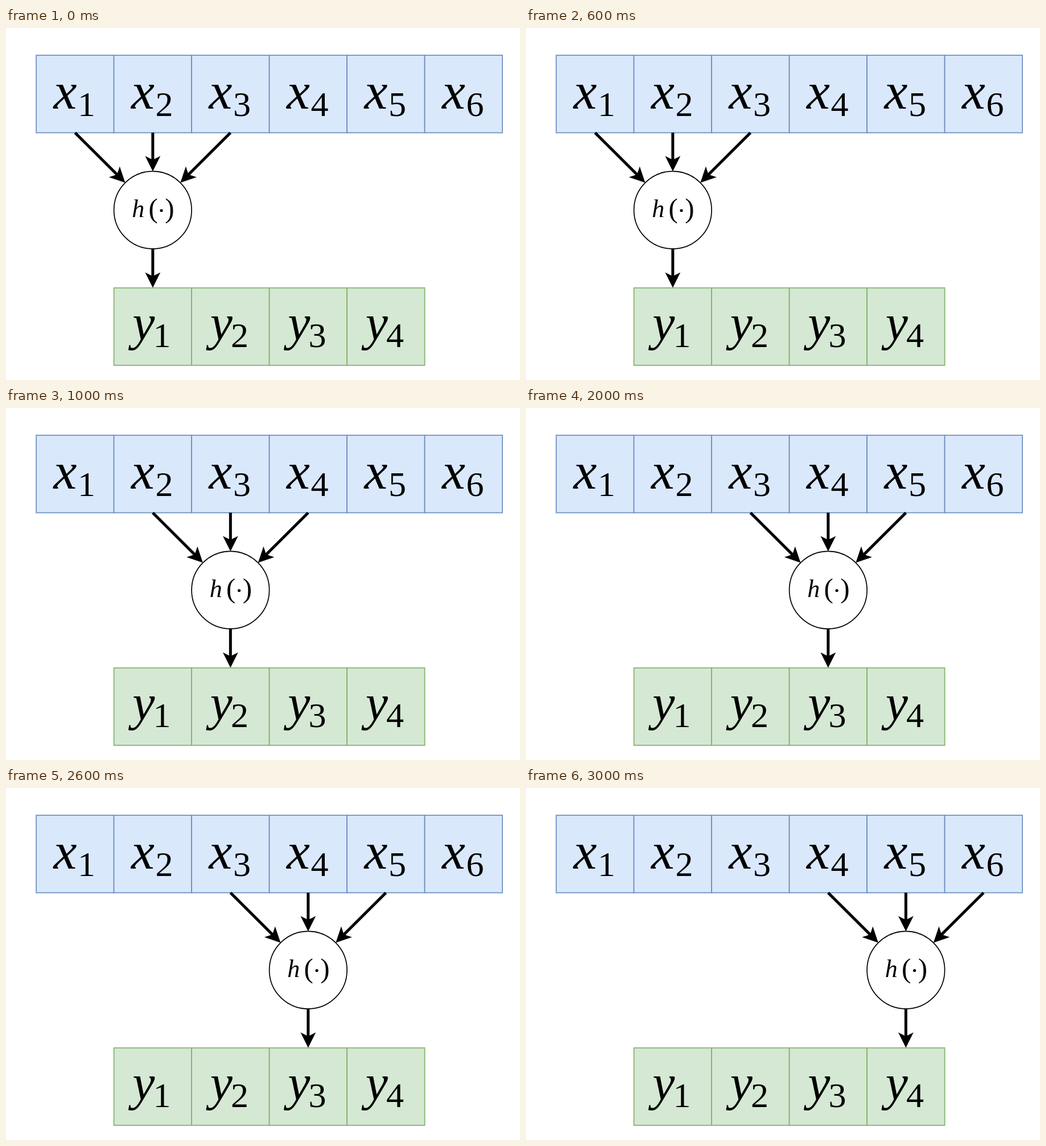
Write an HTML page that moves like this. It is 903 by 620 pixels and loops after 4000 ms.

```html
<!DOCTYPE html>
<html lang="en">
<meta charset="utf-8">
<title>Sliding window</title>
<style>
  html, body { margin: 0; width: 100%; height: 100%; overflow: hidden; background: #fff; }
  svg { display: block; }
  text { font-family: "Liberation Serif", "Times New Roman", serif; }
  .var { font-style: italic; }
  .sub { font-size: 62px; text-anchor: middle; }
  .paren { font-size: 49px; text-anchor: middle; }
  rect, .node { stroke-width: 1.7; }
</style>
<svg width="903" height="620" viewBox="0 0 903 620">
  <g id="cells"></g>
  <g id="kernel"></g>
</svg>
<script>
const CELL = 136.5, LEFT = 53.1, STEP_MS = 1000, STEPS = 4;
const cellGroup = document.getElementById('cells');
const kernelGroup = document.getElementById('kernel');

function row(count, left, y, fill, stroke, name, size, textX, baseline, subX, subBase) {
  let out = '';
  for (let i = 0; i < count; i++) {
    const x = left + i * CELL;
    out += `<rect x="${x}" y="${y}" width="${CELL}" height="${CELL}" fill="${fill}" stroke="${stroke}"/>
      <text class="var" font-size="${size}" x="${x + textX}" y="${baseline}">${name}</text>
      <text class="sub" x="${x + subX}" y="${subBase}">${i + 1}</text>`;
  }
  return out;
}

// The arrow points along +x before it is rotated
function arrow(x, y, length, angle) {
  return `<g transform="translate(${x} ${y}) rotate(${angle})">
    <path d="M0 0H${length - 18}" stroke="#000" stroke-width="5"/>
    <path d="M${length} 0l-27 -13.4l6.7 13.4l-6.7 13.4z"/></g>`;
}

cellGroup.innerHTML =
  row(6, LEFT, 48, '#dae8fc', '#6c8ebf', 'x', 92, 30.4, 141.5, 88.5, 154.5) +
  row(4, LEFT + CELL, 457.7, '#d5e8d4', '#82b366', 'y', 88, 32.6, 549, 84.4, 561.5);

const cx = LEFT + CELL * 1.5, cy = 320.7, r = CELL / 2;
const inputY = 184.4, outputY = 457.5;
const slant = (cy - r * Math.SQRT1_2 - inputY) * Math.SQRT2;

kernelGroup.innerHTML =
  arrow(cx - CELL, inputY, slant, 45) +
  arrow(cx, inputY, cy - r - inputY, 90) +
  arrow(cx + CELL, inputY, slant, 135) +
  arrow(cx, cy + r, outputY - cy - r, 90) +
  `<circle class="node" cx="${cx}" cy="${cy}" r="${r}" fill="#fff" stroke="#000"/>
  <text class="var" font-size="44" x="${cx - 36.5}" y="333">h</text>
  <text class="paren" x="${cx + 0.8}" y="334.3">(</text>
  <circle cx="${cx + 15.2}" cy="321.5" r="2.6"/>
  <text class="paren" x="${cx + 29.5}" y="334.3">)</text>`;

function draw(now) {
  const step = Math.floor(now / STEP_MS) % STEPS;
  kernelGroup.setAttribute('transform', `translate(${step * CELL} 0)`);
  requestAnimationFrame(draw);
}
draw(performance.now());
</script>
</html>
```
